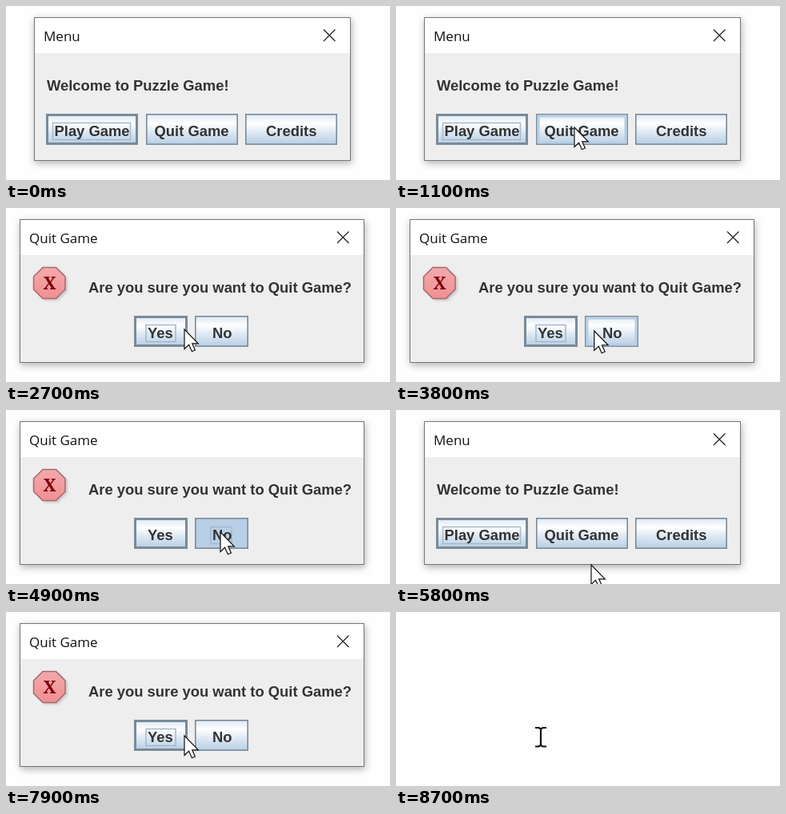
An HTML page for the animation above (9500 ms loop, 480 by 218 pixels).

```html
<!DOCTYPE html>
<html lang="en">
<head>
<meta charset="utf-8">
<title>Puzzle game menu</title>
<style>
html, body { margin: 0; width: 100%; height: 100%; overflow: hidden; background: #fefefe; }
svg { display: block; }
.title { font: 17px "Open Sans", "Noto Sans", sans-serif; fill: #111; }
.label { font: bold 18.4px "Liberation Sans", Arial, sans-serif; fill: #333; }
.frame { fill: #eee; stroke: #777; filter: drop-shadow(1px 3px 5px rgba(0,0,0,.3)); }
.focus { fill: none; stroke: #a3b8cc; stroke-width: 1.5; }
.hover { fill: none; stroke: #b8cfe5; stroke-width: 3; }
</style>
</head>
<body>
<svg id="stage" width="480" height="218" viewBox="0 0 480 218">
  <defs>
    <linearGradient id="metal" x2="0" y2="1">
      <stop stop-color="#dde8f3"/>
      <stop offset=".3" stop-color="#fff"/>
      <stop offset=".6" stop-color="#dde8f3"/>
      <stop offset="1" stop-color="#b8cfe5"/>
    </linearGradient>
    <linearGradient id="pink" x2="0" y2="1">
      <stop stop-color="#f4a9ac"/>
      <stop offset="1" stop-color="#ee9094"/>
    </linearGradient>
  </defs>
  <g id="menu"></g>
  <g id="ask"></g>
  <path id="arrow" d="M0 0V24.5L5.6 19.3 9.4 27.8 13.4 26 9.7 17.8H17.3Z"
    fill="#fff" stroke="#111" stroke-width="1.2"/>
  <path id="beam" d="M174 145H178.5L181 146.5 183.5 145H188M174 168.5H178.5L181 167 183.5 168.5H188M181 146V168"
    fill="none" stroke="#111" stroke-width="2.2"/>
</svg>
<script>
const $ = id => document.getElementById(id);
const LOOP = 9500, STEP = 100;

const text = (cls, x, y, s) => `<text class="${cls}" x="${x}" y="${y}">${s}</text>`;
const box = (x, y, w, h, attrs) => `<rect x="${x}" y="${y}" width="${w}" height="${h}" ${attrs}/>`;

function button(b, mode, focused) {
  const { x, w, label, tx, tw, main } = b;
  const line = main ? 3 : 1.6;
  return box(x + line / 2, 135 + line / 2, w - line, 39 - line,
      `fill="${mode === 'press' ? '#b8cfe5' : 'url(#metal)'}" stroke="#7a8a99" stroke-width="${line}"`) +
    (mode === 'hover' && !main ? box(x + 3, 138, w - 6, 33, 'class="hover"') : '') +
    (focused ? box(tx - 2, 146.5, tw + 2, 21, 'class="focus"') : '') +
    text('label', tx, 163, label);
}

const errorIcon =
  '<path d="M47 76H65L77 88V104L65 116H49L37 104Z" fill="#777" opacity=".3" style="filter:blur(1.5px)"/>' +
  '<path d="M46 74.5H62.5L74 86V102L62.5 113.5H46L34.5 102V86Z" fill="url(#pink)" stroke="#a8686c" stroke-width="1.5"/>' +
  '<text x="54.5" y="102" text-anchor="middle" fill="#800008" font-family="Noto Serif, serif" font-weight="900" font-size="22">X</text>';

const windows = {
  menu: {
    x: 35, w: 395, title: 'Menu',
    body: text('label', 51, 106, 'Welcome to Puzzle Game!'),
    buttons: [
      { x: 50, w: 115, label: 'Play Game', tx: 60.5, tw: 95, main: true },
      { x: 175, w: 115, label: 'Quit Game', tx: 185.5, tw: 94 },
      { x: 299, w: 115, label: 'Credits', tx: 325, tw: 62 }
    ]
  },
  ask: {
    x: 17, w: 430, title: 'Quit Game',
    body: errorIcon + text('label', 103, 106, 'Are you sure you want to Quit Game?'),
    buttons: [
      { x: 160, w: 67, label: 'Yes', tx: 177, tw: 35, main: true },
      { x: 236, w: 67, label: 'No', tx: 258, tw: 24 }
    ]
  }
};

// show/hide times, the button clicked, when it is pressed and when the close box goes
const visits = [
  { win: 'menu', from: -500, to: 2000, click: 1, press: 1900, shut: 1900 },
  { win: 'ask', from: 2000, to: 5000, click: 1, press: 4700, shut: 4900 },
  { win: 'menu', from: 5000, to: 7000, click: 1, press: 6900, shut: 6900 },
  { win: 'ask', from: 7000, to: 8500, click: 0, press: 8300, shut: 8400 }
];

const path = [
  [200, 252, 232], [900, 223, 152], [3500, 223, 152], [4200, 286, 157],
  [4500, 268, 153], [5100, 268, 153], [5800, 244, 194], [5900, 244, 194],
  [6600, 223, 155], [7900, 223, 155], [8300, 181, 157], [LOOP, 181, 157]
];

function pointer(t) {
  const i = path.findIndex(p => p[0] > t);
  if (i === 0) return path[0].slice(1);
  const [t0, x0, y0] = path[i - 1], [t1, x1, y1] = path[i];
  const u = (t - t0) / (t1 - t0), e = u * u * (3 - 2 * u);
  return [x0 + (x1 - x0) * e, y0 + (y1 - y0) * e];
}

function drawWindow(v, t, [px, py]) {
  const { x, w, title, body, buttons } = windows[v.win];
  const g = $(v.win), pressed = t >= v.press, cx = x + w / 2;
  const gap = 1 - Math.min(1, (t - v.from + 130) / 300);
  const scale = 1 - .033 * gap;
  g.setAttribute('opacity', 1 - .6 * gap);
  g.setAttribute('transform', `translate(${cx} 104) scale(${scale}) translate(${-cx} -104)`);
  const c = x + w - 33;
  g.innerHTML = box(x + .5, 14.5, w, 179, 'class="frame"') +
    box(x + 1, 15, w - 1, 44, 'fill="#fff"') +
    text('title', x + 12, 44, title) +
    (t < v.shut ? `<path d="M${c} 29.5l14.5 14.5m0-14.5l-14.5 14.5" stroke="#222" stroke-width="1.3"/>` : '') +
    body +
    buttons.map((b, i) => {
      const over = px >= b.x && px < b.x + b.w && py >= 135 && py < 174;
      const mode = pressed && i === v.click ? 'press' : over ? 'hover' : '';
      return button(b, mode, i === (pressed ? v.click : 0));
    }).join('');
}

let last = -1;
function tick(now) {
  const t = Math.floor(now % LOOP / STEP) * STEP;
  if (t !== last) {
    last = t;
    const at = pointer(t), open = visits.find(v => t >= v.from && t < v.to);
    for (const id in windows) $(id).style.display = open && open.win === id ? '' : 'none';
    if (open) drawWindow(open, t, at);
    $('arrow').setAttribute('transform', `translate(${at})`);
    $('arrow').style.display = open ? '' : 'none';
    $('beam').style.display = open ? 'none' : '';
  }
  requestAnimationFrame(tick);
}
tick(performance.now());
</script>
</body>
</html>
```
